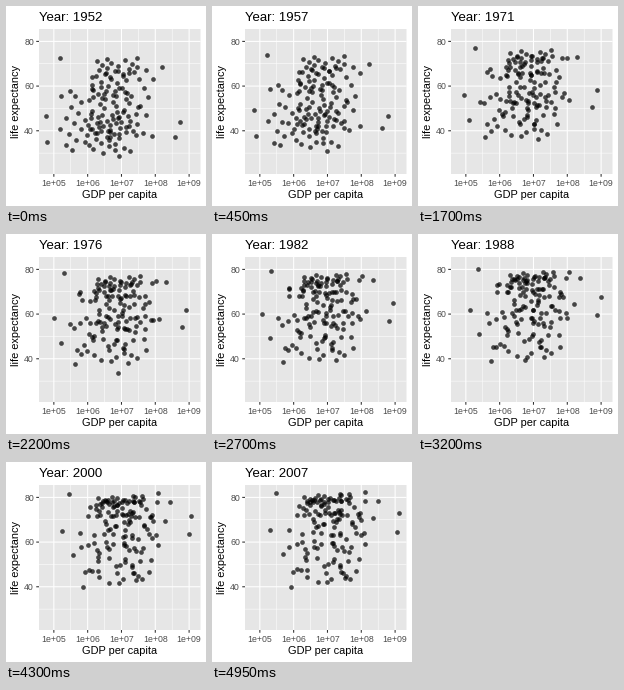
A matplotlib script that plays this animation: 200x200 px, repeating every 5 s.

```python
import numpy as np
import matplotlib.pyplot as plt
from matplotlib.animation import FuncAnimation
from matplotlib.patches import Rectangle

plt.rcParams["font.family"] = "Liberation Sans"

SIZE, DPI = 200, 100
FRAMES, INTERVAL = 100, 50
FIRST, LAST = 1952, 2007
LEFT, RIGHT, TOP, BOTTOM = 33, 194.5, 23, 168
X_LIM = (4.561, 9.337)      # log10 of the horizontal value
Y_LIM = (20.65, 85.55)
PANEL, TICK, TICK_TEXT = "#e6e6e6", "#333333", "#4d4d4d"
GOLDEN = (5 ** 0.5 - 1) / 2

# Outlying points: log size, its growth, first and last life expectancy.
OUTLIERS = [
    (8.745, 0.375, 44.0, 73.0),
    (8.570, 0.475, 37.4, 64.7),
    (8.198, 0.282, 68.4, 78.2),
    (7.937, 0.168, 63.0, 82.6),
    (7.914, 0.435, 37.5, 70.7),
    (4.778, 0.522, 46.5, 65.5),
    (4.800, 0.895, 34.8, 54.8),
    (5.170, 0.310, 72.5, 81.8),
    (5.188, 0.664, 40.7, 65.2),
    (5.204, 1.195, 55.6, 77.6),
    (6.404, 0.544, 40.0, 46.2),
    (6.671, 0.478, 39.4, 59.7),
    (6.926, 0.578, 28.8, 43.8),
]

# Short crises: (outlier index, worst year, years lost).
CRISES = [(0, 1962, 9), (10, 1992, 22), (11, 1977, 20)]

# Groups: count, log size range, growth, first and last life range, ease power.
GROUPS = [
    (8, (7.45, 7.85), 0.38, (37, 69), (47, 80), 1.6),
    (12, (5.35, 5.85), 0.58, (30, 59), (40, 76), 1.8),
    (18, (6.2, 7.6), 0.14, (64, 72.7), (78, 81.5), 1.2),
    (19, (6.1, 7.4), 0.20, (54, 67), (71.5, 79), 1.9),
    (38, (6.0, 7.5), 0.45, (37, 60), (63, 79), 1.6),
    (34, (5.9, 7.3), 0.50, (30, 48.5), (42, 64), 2.3),
]


def px(v):
    """Pixels to points."""
    return v * 72 / DPI


def sx(v):
    return LEFT + (v - X_LIM[0]) / (X_LIM[1] - X_LIM[0]) * (RIGHT - LEFT)


def sy(v):
    return BOTTOM - (v - Y_LIM[0]) / (Y_LIM[1] - Y_LIM[0]) * (BOTTOM - TOP)


def between(limits, u):
    return limits[0] + (limits[1] - limits[0]) * u


def group_tracks(rng, n, sizes, growth, first, last, power):
    """Evenly scattered points that share a trend."""
    i = np.arange(n) + 0.5
    rank = i / n
    later = np.clip(rank + rng.normal(0, 0.12, n), 0, 1)
    return np.column_stack([
        between(sizes, (i * GOLDEN + rng.uniform(0, 0.15, n)) % 1),
        np.clip(rng.normal(growth, 0.08, n), 0.02, None),
        between(first, rank),
        between(last, later),
        np.full(n, power),
    ])


rng = np.random.default_rng(4)
tracks = np.vstack([[(*row, 1.6) for row in OUTLIERS]]
                   + [group_tracks(rng, *g) for g in GROUPS])


def positions(year):
    t = (year - FIRST) / (LAST - FIRST)
    size, growth, first, last, power = tracks.T
    life = first + (last - first) * (1 - (1 - t) ** power)
    for i, worst, loss in CRISES:
        life[i] -= loss * max(0, 1 - abs(year - worst) / 6)
    return np.column_stack([sx(size + growth * t), sy(life)])


def line(x, y, color, width, z):
    ax.plot(x, y, color=color, lw=px(width), solid_capstyle="butt",
            snap=False, zorder=z)


def label(x, y, s, size, color="black", ha="center", **kw):
    return ax.text(x, y, s, fontsize=px(size), color=color, ha=ha,
                   va="baseline", **kw)


fig = plt.figure(figsize=(SIZE / DPI, SIZE / DPI), dpi=DPI, facecolor="white")
ax = fig.add_axes([0, 0, 1, 1])
ax.set(xlim=(0, SIZE), ylim=(SIZE, 0))
ax.axis("off")
ax.add_patch(Rectangle((LEFT, TOP), RIGHT - LEFT, BOTTOM - TOP,
                       fc=PANEL, lw=0, snap=False, zorder=0))

for v in np.arange(5, 9.1, 0.5):
    line([sx(v)] * 2, [TOP, BOTTOM], "white", 1.07 if v % 1 == 0 else 0.53, 1)
for v in range(30, 81, 10):
    line([LEFT, RIGHT], [sy(v)] * 2, "white", 1.07 if v % 20 == 0 else 0.53, 1)

for v in range(5, 10):
    line([sx(v)] * 2, [BOTTOM, BOTTOM + 2.75], TICK, 1.07, 2)
    label(sx(v), 180, f"1e+{v:02d}", 8.8, TICK_TEXT)
for v in (40, 60, 80):
    line([LEFT - 2.75, LEFT], [sy(v)] * 2, TICK, 1.07, 2)
    label(28, sy(v) + 3.2, str(v), 8.8, TICK_TEXT, "right")

label((LEFT + RIGHT) / 2, 192, "GDP per capita", 11)
label(13.5, (TOP + BOTTOM) / 2, "life expectancy", 11,
      rotation=90, rotation_mode="anchor")
title = label(LEFT, 15, "", 13.2, ha="left")
dots = ax.scatter(*positions(FIRST).T, s=px(4.7) ** 2, c="black",
                  alpha=0.7, linewidths=0, zorder=3)


def update(i):
    year = FIRST + (LAST - FIRST) * i / (FRAMES - 1)
    title.set_text(f"Year: {round(year)}")
    dots.set_offsets(positions(year))
    return dots, title


anim = FuncAnimation(fig, update, frames=FRAMES, interval=INTERVAL,
                     repeat=True, repeat_delay=0)
plt.show()
```
